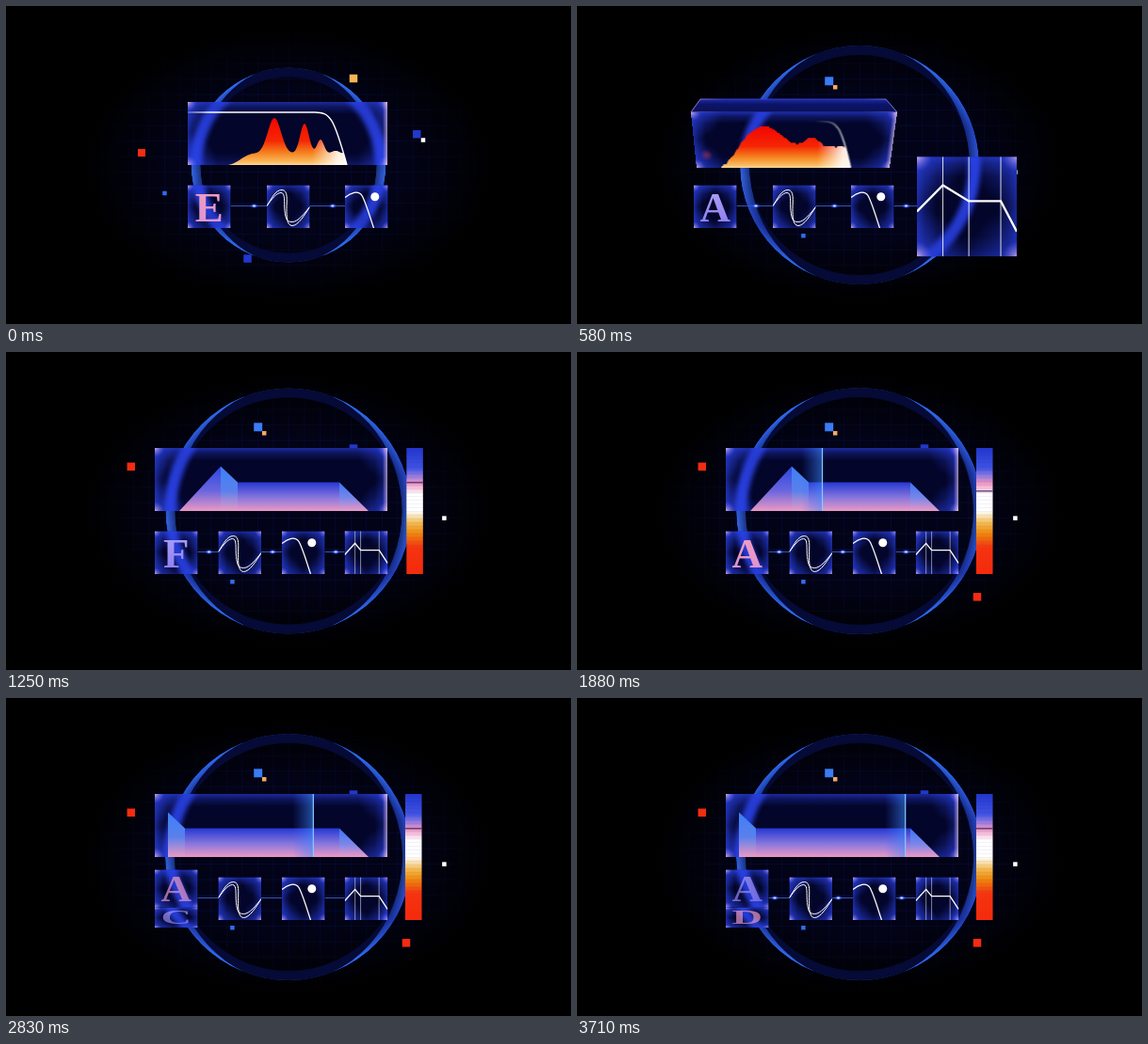
Write an HTML page with a canvas that moves like this. It is 600x338 px and loops after 3750 ms.

```html
<!DOCTYPE html>
<html lang="en">
<head>
<meta charset="utf-8">
<title>Synth modules</title>
<style>
html, body { margin: 0; width: 600px; height: 338px; overflow: hidden; background: #000; }
canvas { display: block; }
</style>
</head>
<body>
<canvas id="stage" width="600" height="338"></canvas>
<script>
const LOOP = 3750, TAU = Math.PI * 2;
const CX = 300, CY = 169, SIZE = 45.5, ROW = 190.5, WIRE = 212.5, TOP = 102, H = 67;
const ctx = document.getElementById('stage').getContext('2d');
const face = document.createElement('canvas');
face.width = 260;
face.height = H;
const fctx = face.getContext('2d');

const clamp = v => Math.min(1, Math.max(0, v));
const mix = (a, b, p) => a + (b - a) * p;
const smooth = (a, b, t) => { const p = clamp((t - a) / (b - a)); return p * p * (3 - 2 * p); };
const bell = (x, c, w) => Math.exp(-((x - c) ** 2) / (2 * w * w));
const blue = a => `rgba(42,66,232,${a})`;
const white = a => `rgba(255,255,255,${a})`;

function linear(g, x0, y0, x1, y1, ...stops) {
  const grad = g.createLinearGradient(x0, y0, x1, y1);
  stops.forEach(([o, c]) => grad.addColorStop(o, c));
  return grad;
}

function radial(g, x, y, r, ...stops) {
  const grad = g.createRadialGradient(x, y, 0, x, y, r);
  stops.forEach(([o, c]) => grad.addColorStop(o, c));
  return grad;
}

function poly(g, pts, fill) {
  g.beginPath();
  pts.forEach(([x, y]) => g.lineTo(x, y));
  g.fillStyle = fill;
  g.fill();
}

// x, y, size, colour, from, to
const squares = [
  [369, 77, 8.5, '#f6b552', 0, 330],
  [144, 156, 8, '#f42c10', 0, 760],
  [436.2, 136.2, 8.5, '#2238cc', 0, 290],
  [443, 142.5, 4.5, '#fff', 0, 290],
  [168.5, 199, 4.5, '#2f6cf0', 0, 250],
  [256.5, 268.5, 8.5, '#2238cc', 0, 400],
  [267.7, 79.8, 9, '#3a7cf4', 420, LOOP],
  [274.2, 86.3, 4.5, '#f5a866', 420, LOOP],
  [240.4, 244.2, 4.5, '#2f6cf0', 460, LOOP],
  [465.4, 176.6, 4.5, '#fff', 520, LOOP],
  [369, 102.5, 8.5, '#2238cc', 700, LOOP],
  [132.8, 121.8, 8.5, '#f42c10', 1060, LOOP],
  [425, 260.3, 8.5, '#f42c10', 1500, LOOP]
];

function backdrop() {
  ctx.fillStyle = '#020318';
  ctx.fillRect(0, 0, 600, 338);
  ctx.strokeStyle = 'rgba(45,60,190,.13)';
  ctx.lineWidth = 1;
  ctx.beginPath();
  for (let x = 69.4; x < 530; x += 16.5) { ctx.moveTo(x, 20); ctx.lineTo(x, 320); }
  for (let y = 28.1; y < 320; y += 16.5) { ctx.moveTo(70, y); ctx.lineTo(530, y); }
  ctx.stroke();
  ctx.save();
  ctx.translate(CX, CY);
  ctx.scale(1.5, 1);
  ctx.fillStyle = radial(ctx, 0, 0, 145, [0, 'rgba(0,0,0,0)'], [.55, 'rgba(0,0,0,.08)'], [1, '#000']);
  ctx.fillRect(-210, -170, 420, 340);
  ctx.restore();
}

const ringRadius = t => 131 - 27.5 * Math.exp(-t / 300);

function ring(g, t) {
  const r = ringRadius(t);
  g.save();
  g.translate(CX, CY);
  g.beginPath();
  g.arc(0, 0, r, 0, TAU);
  g.arc(0, 0, r - 10, 0, TAU);
  g.fillStyle = '#050a36';
  g.fill('evenodd');
  g.clip('evenodd');
  g.beginPath();
  g.arc(0, 0, r, 0, TAU);
  g.closePath();
  g.ellipse(0, 0, r - 10, r * 1.012, 0, 0, TAU);
  g.clip('evenodd');
  g.beginPath();
  g.arc(0, 0, r, 0, TAU);
  g.fillStyle = linear(g, 0, -r, 0, r, [.1, '#2f6cf0'], [.35, '#2444c4'], [.55, '#3364de'], [.75, '#203cb8'], [.9, '#2f6cf0']);
  g.fill();
  const inner = (r - 10) / r;
  g.fillStyle = radial(g, 0, 0, r, [inner, 'rgba(5,10,54,.55)'], [mix(inner, 1, .75), 'rgba(5,10,54,.1)'], [1, 'rgba(5,10,54,0)']);
  g.fill();
  g.restore();
}

// The ring as seen blurred and thickened through a panel.
function frostedRing(g, t) {
  const r = ringRadius(t);
  g.save();
  g.translate(CX, CY);
  g.filter = 'blur(2.5px)';
  g.strokeStyle = linear(g, -r, 0, r, 0, [0, blue(.95)], [.2, blue(.75)], [.35, blue(0)], [.65, blue(0)], [.8, blue(.75)], [1, blue(.95)]);
  g.lineWidth = 13;
  g.beginPath();
  g.arc(0, 0, r - 5, 0, TAU);
  g.stroke();
  g.restore();
}

// Lit glass panel at the local origin; (x, y) is its place on the stage.
function glass(g, t, x, y, w, h) {
  const d = Math.min(w, h);
  g.beginPath();
  g.rect(0, 0, w, h);
  g.clip();
  g.fillStyle = '#03052a';
  g.fillRect(0, 0, w, h);
  g.save();
  g.translate(-x, -y);
  frostedRing(g, t);
  if (t < 760) {
    g.fillStyle = radial(g, 136, 154, 7, [0, 'rgba(210,40,40,.7)'], [1, 'rgba(210,40,40,0)']);
    g.fillRect(128, 146, 16, 16);
  }
  g.restore();
  const edge = d * .2;
  const edges = [[0, 0, 0, edge, .6], [0, 0, edge, 0, .6], [w, 0, w - edge, 0, .55], [0, h, 0, h - edge, .3]];
  for (const [x0, y0, x1, y1, a] of edges) {
    g.fillStyle = linear(g, x0, y0, x1, y1, [0, blue(a)], [.4, blue(a * .45)], [1, blue(0)]);
    g.fillRect(0, 0, w, h);
  }
  for (const [cx, cy, a] of [[0, 0, .6], [w, 0, .5], [0, h, .6], [w, h, .5]]) {
    g.fillStyle = radial(g, cx, cy, d * .48, [0, blue(a)], [.5, blue(a * .6)], [1, blue(0)]);
    g.fillRect(0, 0, w, h);
    g.fillStyle = radial(g, cx, cy, d * .15, [0, `rgba(255,204,226,${a + .15})`], [1, 'rgba(130,120,250,0)']);
    g.fillRect(0, 0, w, h);
  }
}

function spectrum(g, m) {
  const rolloff = new Path2D('M0 11H135C151 11 155 16 169 67');
  const body = new Path2D(rolloff);
  body.lineTo(0, H);
  body.closePath();
  g.save();
  g.clip(body);
  g.beginPath();
  g.moveTo(0, H);
  for (let x = 0; x <= 170; x++) {
    let h = mix(12, 23, m) * smooth(mix(42, 24, m), mix(70, 60, m), x)
      + mix(38, 27, m) * bell(x, mix(92, 75, m), mix(7, 18, m))
      + mix(32, 13, m) * bell(x, mix(124, 126, m), mix(4.6, 8, m))
      + mix(15, 3, m) * bell(x, mix(141, 146, m), 3.6)
      + 3 * bell(x, 157, 4);
    if (m > .3) h = Math.round((h + .6 * m * Math.sin(x * .9)) / 2) * 2;
    g.lineTo(x, H - h);
  }
  g.lineTo(170, H);
  g.clip();
  g.fillStyle = linear(g, 0, 17, 0, H, [0, '#f40600'], [.48, '#f52604'], [.74, '#f5821e'], [.94, '#fabb60'], [1, '#fdd89c']);
  g.fillRect(0, 0, 180, H);
  g.fillStyle = linear(g, 132, 0, 160, 0, [0, white(0)], [1, white(.88)]);
  g.fillRect(132, 0, 50, H);
  g.restore();
  g.strokeStyle = linear(g, 0, 0, 160, 0, [0, white(.3 * (1 - m))], [.15, white(1 - m)], [.8, white(1 - m)], [1, white(1 - .5 * m)]);
  g.lineWidth = mix(1.4, 2.6, m);
  g.stroke(rolloff);
}

function envelope(g, t, w) {
  const cut = smooth(2200, 2700, t);
  const start = mix(26, 14, cut), peak = mix(70, 14, cut), decay = mix(88, 32, cut);
  const low = 36.5, high = 19.5, pink = '#ec98c4';
  const shade = (y, top, mid) => linear(g, 0, y, 0, H, [0, top], [.55, mid], [1, pink]);
  g.save();
  g.scale(w / 247, 1);
  poly(g, [[start, H], [peak, high], [peak, H]], shade(high, '#2b46e0', '#6a66de'));
  poly(g, [[decay, low], [196, low], [196, H], [decay, H]], shade(low, '#2638d4', '#8a78dc'));
  poly(g, [[peak, high], [decay, low], [decay, H], [peak, H]], shade(high, '#3c80f6', '#5a80ec'));
  poly(g, [[196, low], [227, H], [196, H]], shade(low, '#3a74f2', '#7a86ea'));
  g.restore();
}

const sweep = t => ((t - 871) % 422) / 422;

function playhead(g, t, w) {
  if (t < 871) return;
  const p = sweep(t), x = p * 262 * w / 247;
  g.globalAlpha = 1 - smooth(.8, .89, p);
  g.fillStyle = linear(g, x - 22, 0, x, 0, [0, 'rgba(50,110,255,0)'], [1, 'rgba(60,140,255,.55)']);
  g.fillRect(x - 22, 0, 22, H);
  g.fillStyle = '#8cc8ff';
  g.fillRect(x - .5, 0, 1.2, H);
  g.globalAlpha = 1;
}

function drawFace(t, left, w) {
  const g = fctx;
  g.clearRect(0, 0, 260, H);
  g.save();
  glass(g, t, left, TOP, w, H);
  const swap = smooth(700, 820, t);
  g.globalAlpha = 1 - swap;
  if (swap < 1) spectrum(g, smooth(40, 560, t));
  g.globalAlpha = swap;
  if (swap > 0) envelope(g, t, w);
  g.globalAlpha = 1;
  playhead(g, t, w);
  g.fillStyle = linear(g, w - 5, 0, w, 0, [0, 'rgba(255,205,230,0)'], [1, 'rgba(255,215,235,.6)']);
  g.fillRect(w - 5, 0, 5, H);
  g.restore();
}

function card(t, left, w) {
  const k = smooth(60, 450, t) * (1 - smooth(580, 1150, t)), right = left + w;
  drawFace(t, left, w);
  if (k < .002) {
    ctx.drawImage(face, 0, 0, w, H, left, TOP, w, H);
    return;
  }
  const y0 = TOP + 11 * k, y1 = TOP + H + 2.5 * k, back = TOP - 3 * k;
  const lid = [[left + 10 - 3 * k, back], [right - 11 + 3 * k, back], [right + 4 * k, y0], [left - 3 * k, y0]];
  poly(ctx, lid, linear(ctx, 0, back, 0, y0, [0, '#1d2aa6'], [.4, '#0c1468'], [1, '#0a1058']));
  ctx.closePath();
  ctx.strokeStyle = linear(ctx, left, 0, right, 0, [0, '#a88ae0'], [.15, '#3446d6'], [.85, '#2c3ecc'], [1, '#8a86ea']);
  ctx.lineWidth = .9;
  ctx.stroke();
  const step = (y1 - y0) / H;
  for (let i = 0; i < H; i++) {
    const x0 = left + mix(-3, 3, i / H) * k, x1 = right + mix(4, -4, i / H) * k;
    ctx.drawImage(face, 0, i, w, 1, x0, y0 + i * step, x1 - x0, step + .4);
  }
}

function tile(t, x, y, size, content) {
  ctx.save();
  ctx.translate(x, y);
  glass(ctx, t, x, y, size, size);
  ctx.strokeStyle = ctx.fillStyle = '#fff';
  content(size);
  ctx.restore();
}

const waves = [
  new Path2D('M0 22C5 14 9 5 16 5C23 5 21 17 21 25S21 43 27 43S40 32 45.5 23'),
  new Path2D('M0 22C5 15 10 8 15 8C20 8 18 18 19 27S21 39 27 39S40 30 45.5 23')
];
const slope = new Path2D('M0 13C6 8 14 5 18 11C22 18 26 32 30.5 45.5');

function drawWaves() {
  ctx.lineWidth = 1;
  waves.forEach(p => ctx.stroke(p));
}

function drawFilter() {
  ctx.lineWidth = 1.3;
  ctx.stroke(slope);
  ctx.beginPath();
  ctx.arc(31.8, 12.2, 4.5, 0, TAU);
  ctx.fill();
}

function drawShape(size) {
  const p = clamp((size - SIZE) / 60);
  const xs = [mix(.24, .26, p), mix(.37, .52, p), mix(.8, .84, p)];
  ctx.fillStyle = white(mix(.5, .85, p));
  xs.forEach(x => ctx.fillRect(x * size - .5, 0, 1, size));
  ctx.lineWidth = mix(1.3, 2.3, p);
  ctx.beginPath();
  [[0, .55], [xs[0], .285], [xs[1], .445], [xs[2], .445], [1, .75]].forEach(([x, y]) => ctx.lineTo(x * size, y * size));
  ctx.stroke();
}

const letters = 'EADFADACAD', tints = 'plplplpllp';

function letterFace(t, x, y0, y1, n) {
  const k = (y1 - y0) / SIZE;
  if (k < .02) return;
  ctx.save();
  ctx.translate(x, y0);
  ctx.scale(1, k);
  glass(ctx, t, x, ROW, SIZE, SIZE);
  ctx.globalAlpha = k > .99 ? 1 : .7;
  ctx.font = 'bold 45px "Liberation Serif", "Times New Roman", serif';
  ctx.textAlign = 'center';
  ctx.fillStyle = tints[n] === 'p'
    ? linear(ctx, 0, 8, 0, 40, [0, '#f29cc0'], [1, '#dc94d0'])
    : linear(ctx, 0, 8, 0, 40, [0, '#a89cf6'], [1, '#9080f0']);
  ctx.fillText(letters[n], SIZE / 2, 38);
  ctx.restore();
}

// Cube that rolls upward to the next letter.
function letterCube(t, x) {
  const n = Math.floor(t / 440), p = clamp((t % 440 - 150) / 200);
  const turn = Math.sin(p * Math.PI / 2) * Math.PI / 2;
  const h = SIZE / 2, mid = ROW + h, c = Math.cos(turn) * h, s = Math.sin(turn) * h;
  letterFace(t, x, mid - c - s, mid + c - s, n);
  letterFace(t, x, mid + c - s, mid + c + s, n + 1);
}

function wire(t, a, b) {
  if (b <= a) return;
  ctx.fillStyle = '#3450d4';
  ctx.fillRect(a, WIRE - .5, b - a, 1);
  const p = (.65 + t * .001522) % 1, x = mix(a, b, p);
  ctx.save();
  ctx.globalAlpha = 1 - smooth(.85, .94, p);
  ctx.translate(x, WIRE);
  ctx.scale(1.7, 1);
  ctx.fillStyle = radial(ctx, 0, 0, 2.8, [0, '#fff'], [.25, '#b4ccff'], [.5, 'rgba(60,100,255,.65)'], [1, 'rgba(40,70,255,0)']);
  ctx.fillRect(-3, -3, 6, 6);
  ctx.restore();
}

function strip(t) {
  if (t < 1120) return;
  const x = 424 + 80 * 2 ** (-10 * (t - 1120) / 220);
  ctx.fillStyle = linear(ctx, 0, 102, 0, 236, [0, '#2236cc'], [.16, '#3f52e2'], [.22, '#8f7ae0'], [.28, '#ee96c2'],
    [.37, '#fff'], [.5, '#fff'], [.6, '#f3b84a'], [.68, '#f0860e'], [.79, '#f43410'], [1, '#f42a0c']);
  ctx.fillRect(x, 102, 17.5, 134);
  ctx.fillStyle = 'rgba(20,20,120,.06)';
  for (let y = 105; y < 206; y += 4) ctx.fillRect(x, y, 17.5, 1);
  const y = 138.7 + 10 * Math.max(0, 1 - Math.abs(sweep(t) - .37) / .22);
  ctx.fillStyle = '#4a2a62';
  ctx.fillRect(x, y - .5, 17.5, 1.2);
}

function draw(t) {
  const shift = smooth(40, 540, t), spread = smooth(720, 1250, t);
  const place = (a, b, c) => mix(mix(a, b, shift), c, spread);
  const x1 = place(193, 124, 158), x2 = place(277, 208, 225.5), x3 = place(360, 291, 293);
  const size = t < 580 ? 106 * smooth(250, 540, t) : SIZE + 60.5 * Math.exp((580 - t) / 120);
  const x4 = mix(414, 382.5, spread) - size / 2, y4 = 213.2 - size / 2;
  const w = mix(212, 247, spread);

  backdrop();
  ring(ctx, t);
  for (const [x, y, s, color, from, to] of squares) {
    if (t < from || t >= to) continue;
    ctx.fillStyle = color;
    ctx.fillRect(x - s / 2, y - s / 2, s, s);
  }
  strip(t);
  card(t, x1, w);
  wire(t, x1 + SIZE, x2);
  wire(t, x2 + SIZE, x3);
  if (size > 1) wire(t, x3 + SIZE, x4);
  letterCube(t, x1);
  tile(t, x2, ROW, SIZE, drawWaves);
  tile(t, x3, ROW, SIZE, drawFilter);
  if (size > 1) tile(t, x4, y4, size, drawShape);
}

let begin;
function tick(now) {
  begin ??= now;
  draw((now - begin) % LOOP);
  requestAnimationFrame(tick);
}
requestAnimationFrame(tick);
</script>
</body>
</html>
```
